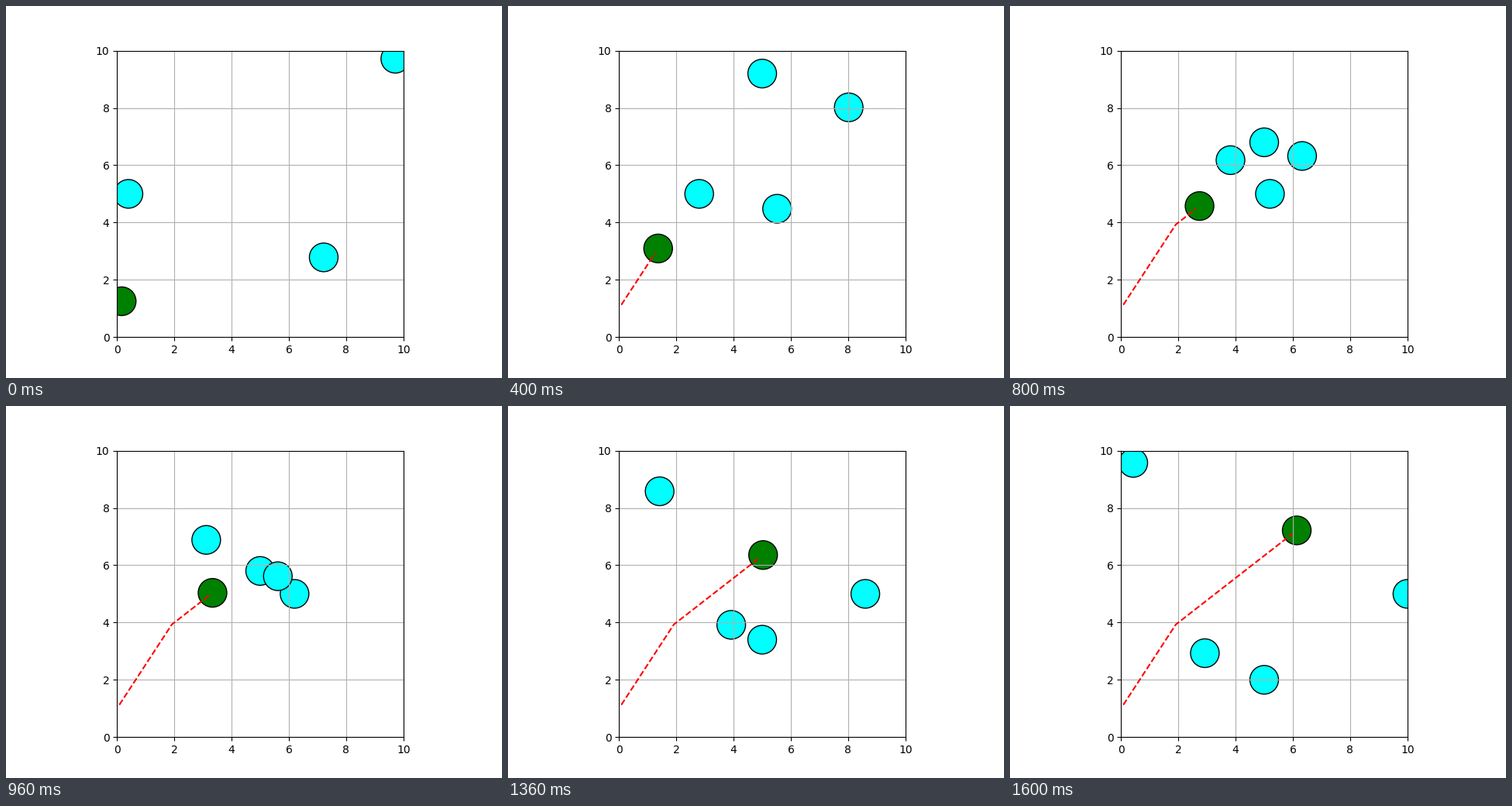
Animation of 640 by 480 pixels, one loop 1640 ms. Source, as a matplotlib script:

```python
import numpy as np
import matplotlib.pyplot as plt
from matplotlib.animation import FuncAnimation

LOOP_MS, TICK_MS = 1640, 10
LAST_STEP = 48
RADIUS = 0.5
OBSTACLE_SPEED = 0.2
SLOW, FAST = 0.15, 0.2
TURN = 2 * np.pi / 19
DIAG = np.sqrt(0.5)

# Obstacles: start point and unit direction, in drawing order
STARTS = np.array([(0, 5), (5, 12), (10, 10), (7.5, 2.5)])
HEADINGS = np.array([(1, 0), (0, -1), (-DIAG, -DIAG), (-DIAG, DIAG)])


def robot_path():
    """Positions from two steps before the first picture to the last one."""
    legs = [(6, SLOW, 3), (13, FAST, 3), (17, SLOW, 2), (14, FAST, 2)]
    moves = [(0, 1)]
    for count, speed, turns in legs:
        angle = turns * TURN
        moves += [(speed * np.cos(angle), speed * np.sin(angle))] * count
    return np.cumsum(moves, axis=0)


def step_at(ms):
    """Steps last 30, 30 and 40 ms in turn."""
    return min(ms // 100 * 3 + min(ms % 100 // 30, 2), LAST_STEP)


def add_disc(color):
    return ax.add_patch(plt.Circle((0, 0), RADIUS, facecolor=color, edgecolor="black"))


path = robot_path()

fig = plt.figure(figsize=(6.4, 4.8), dpi=100)
ax = fig.add_subplot()
ax.set(xlim=(0, 10), ylim=(0, 10), aspect="equal")
ax.grid(True)

robot = add_disc("green")
obstacles = [add_disc("cyan") for _ in STARTS]
trail, = ax.plot([], [], "r--")


def draw(tick):
    now = step_at(tick * TICK_MS) + 2
    robot.center = path[now]
    trail.set_data(*path[1:now].T)
    for disc, start, heading in zip(obstacles, STARTS, HEADINGS):
        disc.center = start + heading * OBSTACLE_SPEED * now
    return [robot, trail, *obstacles]


# The pulled-in diagonal movers share the obstacle speed
anim = FuncAnimation(fig, draw, frames=LOOP_MS // TICK_MS, interval=TICK_MS,
                     init_func=lambda: draw(0), repeat=True, repeat_delay=0)
plt.show()
```
